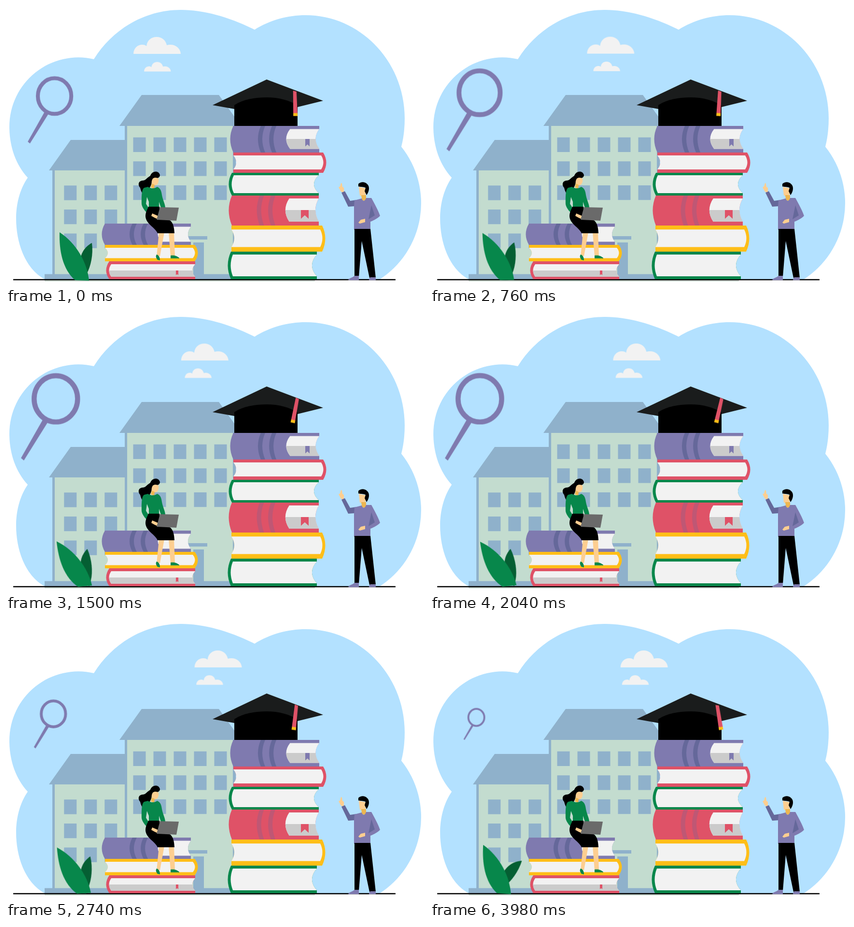
Recreate the animation shown at these times as an HTML page. Size 866x577 px, loop 4 s.

```html
<!DOCTYPE html>
<html lang="en">
<head>
<meta charset="utf-8">
<title>Study</title>
<style>
  html, body { margin: 0; width: 100%; height: 100%; overflow: hidden; background: #fff; }
  svg { display: block; width: 866px; height: 577px; }
  .sky { fill: #b3e1ff; }
  .blue { fill: #8fb1cb; }
  .wall { fill: #c3dccf; }
  .paper { fill: #f2f2f2; }
  .shade { fill: #cbcbcb; }
  .purple { fill: #7f7aaf; }
  .dusk { fill: #65689a; }
  .green { fill: #07874b; }
  .pine { fill: #055f33; }
  .red { fill: #df5267; }
  .plum { fill: #bf5774; }
  .yellow { fill: #ffbe18; }
  .skin { fill: #fdce90; }
  .neck { fill: #edb650; }
  .ink { fill: #000; }
  #tassel { transform-origin: 599px 201px; }
  #leafFront { transform-origin: 141px 518px; }
  #leafBack { transform-origin: 166px 522px; }
</style>
</head>
<body>
<svg viewBox="0 0 866 577">
  <defs>
    <path id="puff" class="paper" d="M0 0C0-12 9-19 18-19C22-19 25-18 27-16C28-28 37-35 48-35C59-35 67-28 69-18C83-22 97-14 98 0Z"/>
  </defs>
  <path class="sky" d="M82 566C40 545 21 490 21 440C21 410 28 380 45 355C20 328 7 290 7 250A143 143 0 0 1 182 110C222 46 290 8 362 8C412 8 465 24 515 49C547 29 583 19 621 19C734 19 826 115 826 232C826 252 824 272 819 291A187 187 0 0 1 773 566Z"/>

  <g id="cloudBig"><use href="#puff"/></g>
  <g id="cloudSmall"><use href="#puff" transform="scale(.566)"/></g>

  <g id="lens">
    <ellipse cx="11.5" cy="-38" rx="45.2" ry="48" fill="none" stroke="#7f7aaf" stroke-width="10.5"/>
    <path class="purple" d="M-15 4L-5 10L-55 90L-61 85Z"/>
  </g>

  <g id="school">
    <path class="wall" d="M96 340H246V248H476V555H96Z"/>
    <path class="blue" d="M281 184H441L487 248H235ZM134 277H246V340H89ZM96 340H101V555H96ZM246 248H251V555H246ZM470 248H476V555H470ZM80 554.500H640V566H80ZM360 476H417V483H360ZM388 489H410V555H388Z"/>
  </g>
  <path d="M80 566H640V569.500H80Z" fill="#c9d8cf"/>
  <path d="M15 566H807" stroke="#000" stroke-width="2.600"/>

  <path id="leafBack" class="pine" d="M178 490C162 498 152 515 153 537C154 550 157 559 160 566L167 554C176 538 181 514 178 490Z"/>
  <path id="leafFront" class="green" d="M111 468C110 506 117 544 143 567L172 568C168 530 146 491 111 468Z"/>

  <g id="books"></g>

  <g id="cap">
    <path d="M428 205L540 152L657 196L604 209L473 213Z" fill="#1a1c1c"/>
    <path class="ink" d="M473 205C493 192 518 189 540 189C565 189 588 195 604 206V248H473Z"/>
    <g id="tassel">
      <path class="red" d="M595 175L602 177L603.700 222H595Z"/>
      <path class="yellow" d="M595 221.500H603.700L604 227.500H595Z"/>
    </g>
  </g>

  <g id="woman">
    <path class="ink" d="M299 351C303 340 317 340 319 350C318 357 311 356 307 357C300 364 302 374 294 380L283 388C280 384 279 380 278 376C272 370 275 361 283 361C289 361 290 357 299 351Z"/>
    <path class="skin" d="M304 357C308 354 313 355 316 357C317 363 315 370 309 371L302 369C301 364 302 360 304 357Z"/>
    <path class="neck" d="M302 367L308 370L307 378L300 375Z"/>
    <path class="skin" d="M317 468H328L319 517L312 518ZM337 468H348L350 518H341Z"/>
    <path class="green" d="M312 514C316 515 319 519 319 526L314 525C310 520 310 517 312 514ZM341 516C347 515 354 516 359 521V522H341Z"/>
    <path class="green" d="M294 374C302 379 309 377 313 374C320 376 322 383 323 391C325 402 330 410 330 418L322 420L317 405V418H296V405L292 395L290 409L303 430L300 435C291 428 282 418 281 410C281 397 280 381 286 376Z"/>
    <path class="ink" d="M295 415H318L320 440C337 439 348 442 349 470H314C309 458 290 451 289 435C289 426 293 421 295 415Z"/>
    <path class="skin" d="M303 429L310 432L317 435L315 441L308 438L301 434Z"/>
    <path d="M319 416L358 417L353 444L312 442Z" fill="#6a6a6a"/>
  </g>

  <g id="man">
    <path class="skin" d="M694 384L689 375L692 373L694 366L696 367L697 374L700 376V386ZM731 374L747 377L744 394L733 392Z"/>
    <path class="ink" d="M730 368C735 363 743 363 748 368C754 373 753 383 747 391L743 383L745 376C739 373 733 375 730 373Z"/>
    <path class="neck" d="M736 391H746V399C744 404 739 404 737 399Z"/>
    <path class="dusk" d="M695 386L702 383L713 403L726 401L723 414L709 415Z"/>
    <path class="purple" d="M722 402L737 398C739 405 744 404 746 397L757 397C764 410 771 422 775 434C768 441 758 445 755 446V463H721V415Z"/>
    <path class="dusk" d="M757 412L764 433L751 441Z"/>
    <path class="skin" d="M744 440L735 442L730 448L733 450L744 447Z"/>
    <path class="ink" d="M722 461H755L766 562H753L737 486L731 560H722Z"/>
    <path class="purple" d="M722 558H731V567H709C711 562 718 562 722 558ZM755 561H766V567H752C752 564 753 563 755 561Z"/>
  </g>
</svg>
<script>
const $ = id => document.getElementById(id);

function add(parent, d, look) {
  const path = document.createElementNS('http://www.w3.org/2000/svg', 'path');
  path.setAttribute('d', d);
  path.setAttribute('class', look);
  parent.appendChild(path);
}

function windows(x, y, cols) {
  for (let i = 0; i < cols * 3; i++) {
    const col = i % cols, row = Math.floor(i / cols);
    add($('school'), `M${x + 42 * col} ${y + 49.6 * row}h26v30.3h-26z`, 'blue');
  }
}
windows(263.5, 271.7, 5);
windows(120.3, 371.3, 3);

// A lying book from its spine to its open side; a hardback's cover wraps most of it
function book(color, top, bottom, spine, open, { bar = 6, base = bar, dip = 6, band, shade, mark } = {}) {
  const g = $('books'), width = open - spine, dir = Math.sign(width);
  const yt = top + bar, yb = bottom - base, my = (yt + yb) / 2, qy = (my + yb) / 2;
  const page = band ? spine + width * .66 : spine + 4 * dir;
  const swell = (band ? 8 : 4.5) * dir;
  const inner = open - dip * dir, edge = `V${yt}Q${open - 2 * dip * dir} ${my} ${open} ${yb}`;
  add(g, `M${spine} ${top}H${open}${edge}V${bottom}H${spine}Q${spine - 13 * dir} ${my} ${spine} ${top}Z`, color);
  add(g, `M${page} ${yt}H${open}${edge}H${page}Q${page - 2 * swell} ${my} ${page} ${yt}Z`, 'paper');
  if (shade) {
    const left = page - swell;
    add(g, `M${left} ${my}H${inner}Q${inner} ${qy} ${open} ${yb}H${page}Q${left} ${qy} ${left} ${my}Z`, 'shade');
  }
  if (band) for (const part of [.32, .45]) {
    const x = spine + width * part;
    add(g, `M${x} ${top}Q${x - 12} ${my} ${x} ${bottom}h9Q${x - 3} ${my} ${x + 9} ${top}Z`, band);
  }
  if (mark) {
    const [x, w] = mark, notch = w * .45;
    add(g, `M${x} ${my}h${w}v${(yb - my) * .75}l${-w / 2} ${-notch}l${-w / 2} ${notch}z`, color);
  }
}
book('purple', 248, 303, 471, 649, { bar: 6.5, base: 7.5, dip: 7.5, band: 'dusk', shade: true, mark: [620, 9] });
book('red', 303, 345, 657, 471, { base: 7 });
book('green', 345, 392, 468, 648, { bar: 5, dip: 10 });
book('red', 392, 454, 468, 648, { base: 8, dip: 7, band: 'plum', shade: true, mark: [611, 16] });
book('yellow', 454, 508, 655, 467, { bar: 8.3, base: 9.5 });
book('green', 508, 565, 466, 644, { dip: 10 });
book('purple', 450, 494, 205, 383, { bar: 6.5, band: 'dusk' });
book('yellow', 494, 528, 391, 205, { base: 6.5 });
book('red', 528, 565, 214, 392, { base: 5, shade: true, mark: [352, 5] });

const OUT = 'cubic-bezier(.333, 1, .667, 1)';
const SINE = 'cubic-bezier(.37, 0, .63, 1)';
const SNAP = 'cubic-bezier(.28, 0, .1, 1)';

// Evenly spaced poses, each with the easing that leads out of it
function move(id, easings, ...poses) {
  const frames = poses.map((transform, i) => ({ transform, easing: easings[i] || 'linear' }));
  $(id).animate(frames, { duration: 4000, iterations: Infinity });
}
const zoom = s => `translate(91.8px, 215.3px) scale(${s})`;
const turn = (deg, x = 0, y = 0) => `translate(${x}px, ${y}px) rotate(${deg}deg)`;
const sway = (id, ...poses) => move(id, [SINE, SINE], ...poses);

move('cloudBig', [OUT], 'translate(264px, 99px)', 'translate(394.7px, 98px)');
move('cloudSmall', [OUT], 'translate(286px, 135.5px)', 'translate(397.8px, 134px)');
move('lens', [OUT, SNAP], zoom(.766), zoom(1), zoom(.366));
sway('tassel', turn(-.5), turn(14), turn(-8));
sway('leafFront', turn(0), turn(-8.7), turn(2, -2.6, -2));
sway('leafBack', turn(0), turn(-19), turn(25));
</script>
</body>
</html>
```
